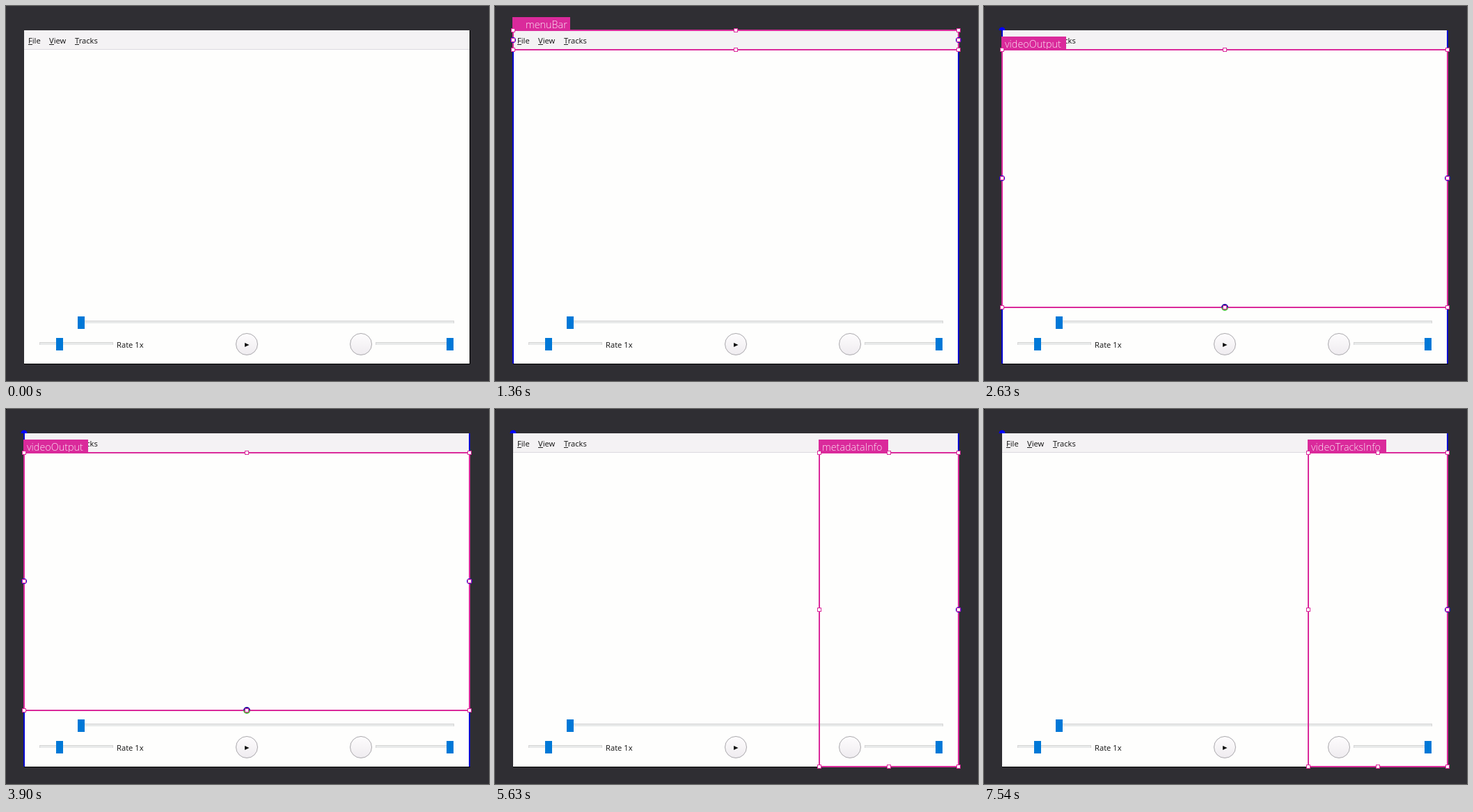
An HTML page with a canvas that plays this animation: 694 px wide and 540 px high, repeating every 8000 ms.

```html
<!DOCTYPE html>
<html lang="en">
<head>
<meta charset="utf-8">
<title>Form editor</title>
<style>
  html, body { margin: 0; width: 100%; height: 100%; overflow: hidden; background: #2f2e33; }
  canvas { display: block; }
</style>
</head>
<body>
<canvas id="stage" width="694" height="540"></canvas>
<script>
const ctx = document.getElementById('stage').getContext('2d');
const LOOP = 8000;
const PINK = '#da2a9b', BLUE = '#0808d0', ACCENT = '#0078d7';
const SANS = '"Open Sans", "Noto Sans", sans-serif';
const WIN = { l: 26, t: 35, r: 666, b: 515 };

// Selected item at each moment; label is [left, top, width, text inset]
const menu = { name: 'menuBar', box: [26, 35, 640, 28], label: [25, 16, 83, 19], kind: 'menu' };
const video = { name: 'videoOutput', box: [26, 63, 640, 371], label: [25, 44, 93, 5], kind: 'video' };
const panel = (name, width) =>
  ({ name, box: [466, 63, 200, 452], label: [465, 44, width, 5], kind: 'panel' });

const steps = [
  [0, null],
  [90, menu],
  [2360, video],
  [4000, panel('metadataInfo', 100)],
  [5720, panel('audioTracksInfo', 115)],
  [7450, panel('videoTracksInfo', 113)]
];

function rect(x, y, w, h, color) {
  ctx.fillStyle = color;
  ctx.fillRect(x, y, w, h);
}

function text(str, x, y, size, color, weight = 400) {
  ctx.font = `${weight} ${size}px ${SANS}`;
  ctx.fillStyle = color;
  ctx.fillText(str, x, y);
}

function dot(x, y, r, color, from = 0, to = Math.PI * 2) {
  ctx.beginPath();
  ctx.arc(x, y, r, from, to);
  ctx.fillStyle = color;
  ctx.fill();
}

function menuItem(str, x, keyWidth) {
  text(str, x, 54, 11.2, '#111');
  rect(x, 55, keyWidth, 1, '#222');
}

function slider(x, y, w, handleX) {
  rect(x, y, w, 4, '#d6d6d6');
  rect(x + 1, y + 1, w - 2, 3, '#e8eaea');
  rect(handleX, y - 6, 10, 18, ACCENT);
}

function roundButton(x, y) {
  const shade = ctx.createLinearGradient(0, y - 16, 0, y + 16);
  shade.addColorStop(0, '#fefdfe');
  shade.addColorStop(1, '#eeebef');
  dot(x, y, 15.5, shade);
  ctx.strokeStyle = '#aaa8ac';
  ctx.lineWidth = 1;
  ctx.stroke();
}

function drawPlayer() {
  rect(0, 0, 694, 540, '#2f2e33');
  rect(26, 35, 641, 481, '#000');
  rect(26, 35, 640, 480, '#fefefd');
  rect(26, 35, 640, 27, '#f4f2f4');
  rect(26, 62, 640, 1, '#dcdadf');
  menuItem('File', 32, 6);
  menuItem('View', 62, 7);
  menuItem('Tracks', 99, 6);

  slider(104, 453, 540, 103);
  slider(48, 484, 106, 72);
  slider(531, 484, 112, 633);
  text('Rate 1x', 159, 492, 11.2, '#111');

  roundButton(346, 487);
  ctx.beginPath();
  ctx.moveTo(343, 485);
  ctx.lineTo(349.5, 488);
  ctx.lineTo(343, 491);
  ctx.fillStyle = '#111';
  ctx.fill();
  roundButton(510, 487);
}

function drawAnchors(kind, midY) {
  const side = (x, bottom) => rect(x - 1, WIN.t, 2, bottom - WIN.t, BLUE);
  side(WIN.r, kind === 'panel' ? 63 : WIN.b);
  if (kind !== 'panel') side(WIN.l, WIN.b);
  if (kind !== 'menu') dot(WIN.l, 35, 4.5, '#0000ff', Math.PI, 0);
}

function drawAnchorDots(kind, midY) {
  dot(WIN.r, midY, 4, '#2010e0');
  if (kind !== 'panel') dot(WIN.l, midY, 4, '#2010e0');
  if (kind === 'video') {
    dot(346, 434, 5, '#2010a0', Math.PI, 0);
    dot(346, 434, 5, '#4fb83c', 0, Math.PI);
  }
}

function drawSelection({ name, box, label, kind }) {
  const [x, y, w, h] = box;
  const [lx, ly, lw, inset] = label;
  const midY = y + h / 2;
  drawAnchors(kind);

  rect(lx, ly, lw, 19, PINK);
  text(name, lx + inset, ly + 16, 14.4, '#fbe4f3', 300);

  ctx.strokeStyle = PINK;
  ctx.lineWidth = 2;
  ctx.strokeRect(x, y, w, h);
  drawAnchorDots(kind, Math.floor(midY));

  ctx.lineWidth = 1;
  for (const fx of [0, 0.5, 1]) {
    for (const fy of [0, 0.5, 1]) {
      if (fx === 0.5 && fy === 0.5) continue;
      const hx = Math.floor(x + w * fx), hy = Math.floor(y + h * fy);
      rect(hx - 2, hy - 2, 4, 4, '#fff');
      ctx.strokeRect(hx - 2.5, hy - 2.5, 5, 5);
    }
  }
  rect(0, 0, 1, 1, '#000');
}

function draw(now) {
  const t = now % LOOP;
  const item = steps.filter(([at]) => at <= t).pop()[1];
  drawPlayer();
  if (item) drawSelection(item);
}

const start = performance.now();
function tick() {
  draw(performance.now() - start);
  requestAnimationFrame(tick);
}
tick();
</script>
</body>
</html>
```
